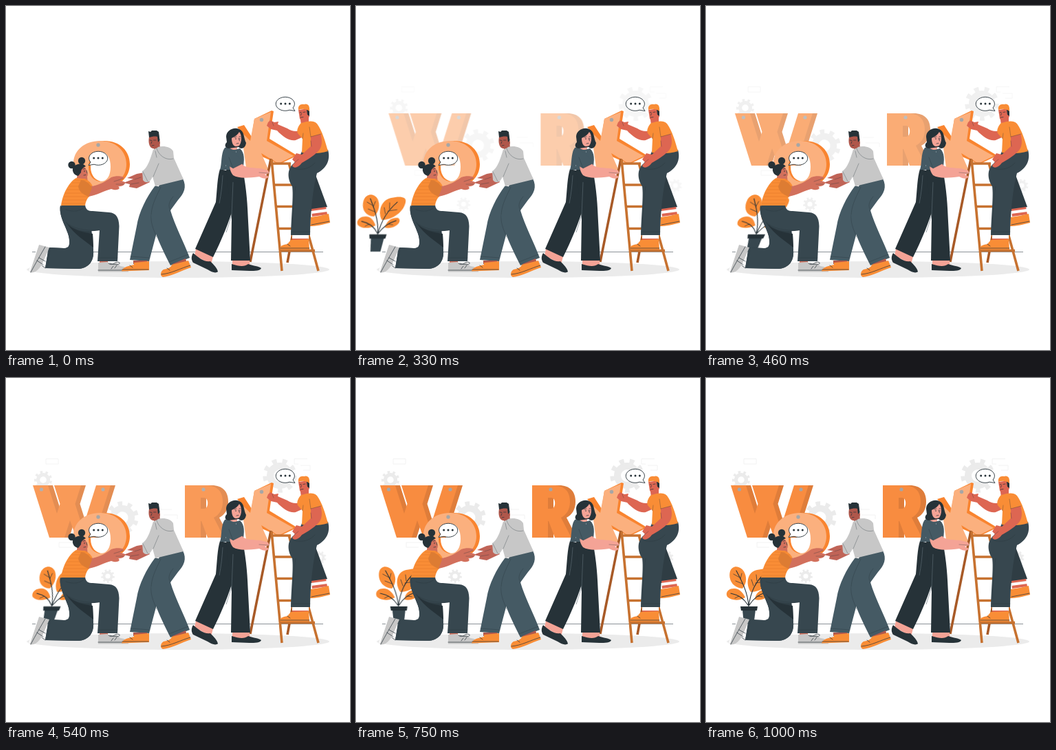
These frames come from a looping animation (500 by 500 pixels, 1040 ms). An HTML page:

```html
<!DOCTYPE html>
<html lang="en">
<head>
<meta charset="utf-8">
<title>Work</title>
<style>
  html, body { margin: 0; width: 100%; height: 100%; overflow: hidden; background: #fff; }
  svg { display: block; width: 100%; height: 100%; }
  .slide { animation: slide 1040ms linear infinite; }
  .plant { transform-origin: 62px 332px; animation: rush 1040ms linear infinite; }
  @keyframes slide {
    0% { transform: translateX(26px); opacity: 0; }
    24.04% { transform: translateX(15px); opacity: .27; }
    31.73% { transform: translateX(11.4px); opacity: .43; }
    44.23% { transform: translateX(6px); opacity: .72; }
    51.92% { transform: translateX(3px); opacity: .87; }
    62% { transform: translateX(.2px); opacity: .97; }
    72.12% { transform: translateX(-1px); opacity: 1; }
    96.15%, 100% { transform: none; opacity: 1; }
  }
  @keyframes rush {
    0% { transform: translateX(-190px) skewX(30deg); }
    24.04% { transform: translateX(-96px) skewX(20deg); }
    31.73% { transform: translateX(-31px) skewX(-8deg); }
    39% { transform: translateX(4px) skewX(-14deg); }
    44.23% { transform: translateX(11px) skewX(-16deg); }
    51.92% { transform: translateX(4.5px) skewX(-13deg); }
    62% { transform: translateX(1px) skewX(-4deg); }
    72.12% { transform: translateX(-.3px) skewX(1deg); }
    96.15%, 100% { transform: translateX(0) skewX(0deg); }
  }
  .face { fill: #f88c40; }
  .side { fill: #df7d3a; }
  .pin { fill: #a6a6a6; }
  .orange { fill: #f98d36; }
  .peach { fill: #fbb07e; }
  .slate { fill: #37474f; }
  .steel { fill: #455a64; }
  .ink { fill: #263238; }
  .grey { fill: #c7c7c7; }
  .s1 { fill: #d2705c; }
  .s2 { fill: #b0574b; }
  .s3 { fill: #f4a396; }
  .s4 { fill: #dd6652; }
  .line { fill: none; stroke: #263238; stroke-width: .7; stroke-linecap: round; stroke-linejoin: round; }
  .soft { fill: none; stroke: #263238; stroke-opacity: .55; stroke-width: .6; stroke-linecap: round; }
  .wood { fill: none; stroke: #c77230; stroke-width: 3.6; }
</style>
</head>
<body>
<svg viewBox="0 0 500 500">
  <defs>
    <g id="gear" fill="none" stroke="#ebebeb">
      <circle r="14" stroke-width="10"/>
      <circle r="21" stroke-width="7.5" pathLength="18" stroke-dasharray=".9 1.1"/>
    </g>
    <path id="w" d="M36 156H58L71 197L75.5 183L67 156H106L97.5 183L108.500 218L128 156H149L125 232H99L90 207L82 232H60Z"/>
    <path id="r" fill-rule="evenodd" d="M257 156H288C304 156 312 165 312 180C312 191 307 199 299 203L314 232H290L281 208H280V232H257ZM280 174V190H285C292 190 292 174 285 174Z"/>
    <g id="bubble">
      <path d="M-11 6L-14 10.500L-6 9.200A13.600 10 0 1 0 -11 6Z" fill="#fff" stroke="#263238" stroke-width=".9"/>
    </g>
    <g id="dots" class="ink"><circle cx="-6.300" r="1.500"/><circle r="1.500"/><circle cx="6.300" r="1.500"/></g>
  </defs>

  <ellipse cx="250" cy="383" rx="220" ry="12" fill="#ebebeb"/>
  <path d="M38 357.500H461" stroke="#59636a" stroke-width=".7"/>

  <g class="slide">
    <g fill="none" stroke="#f1f1f1" stroke-width=".9">
      <path d="M55 117.500H73V125H55ZM416 117.500H435M416 117.500V125H422M425 127H439V134H429M74 239H97M74 239V246H92M222 191H238M226 199H246V205"/>
    </g>
    <use href="#gear" transform="translate(395 142)"/>
    <use href="#gear" transform="translate(166 203) rotate(12) scale(.96)"/>
    <use href="#gear" transform="translate(51 148) rotate(8) scale(.53)"/>
    <use href="#gear" transform="translate(145 288) scale(.4)"/>
    <use href="#gear" transform="translate(453 261) rotate(10) scale(.38)"/>
    <g class="side">
      <use href="#w" x="7"/><use href="#w" x="3.500"/>
      <use href="#r" x="8"/><use href="#r" x="4"/>
    </g>
    <g class="face"><use href="#w"/><use href="#r"/></g>
    <g class="pin"><circle cx="48.500" cy="162" r="2.600"/><circle cx="138" cy="162" r="2.600"/><circle cx="284" cy="162" r="2.600"/></g>
  </g>

  <g class="plant">
    <g class="orange">
      <path d="M53 306C38 305 32 292 35 281C38 272 49 272 55 281C60 290 59 299 53 306Z"/>
      <path d="M65 311C57 299 60 282 74 279C86 276 96 277 96 284C96 299 81 311 65 311Z"/>
      <path d="M57 319C49 324 37 324 31 318C27 311 34 305 42 306C50 307 54 313 57 319Z"/>
      <path d="M71 322C72 312 79 307 88 308C94 311 91 318 84 321C79 323 75 323 71 322Z"/>
    </g>
    <path class="line" style="stroke-width:1.100" d="M62 332C61 312 52 295 44 280M62 332C65 309 73 296 84 285M61 330C55 320 46 315 36 313M63 330C69 320 76 315 86 312"/>
    <path class="line" d="M49 290L40 285M53 299L43 295M50 292L52 284M69 302L66 293M74 295L73 286M72 298L85 296M48 317L42 320M75 317L82 318"/>
    <path class="slate" d="M53 337H72L69.500 357H55Z"/>
    <path class="ink" d="M50 332H75L74 338H51Z"/>
  </g>

  <!-- Letter O -->
  <path fill="#f9842f" fill-rule="evenodd" d="M143 196C166 196 180 211 180 230C180 249 165 263 143 263C120 263 104 248 104 229C104 210 120 196 143 196ZM141 212C131 212 123 221 123 234C123 247 131 255 141 255C150 255 156 246 154 234C153 221 149 212 141 212Z"/>
  <path class="peach" fill-rule="evenodd" d="M137 196C160 196 175 211 175 230C175 249 160 263 137 263C114 263 98 248 98 229C98 210 114 196 137 196ZM137 212C127 212 120 221 120 234C120 247 128 255 138 255C147 255 152 246 152 234C152 221 147 212 137 212Z"/>
  <circle class="pin" cx="134" cy="202" r="2.700"/>

  <!-- Kneeling woman -->
  <g>
    <path fill="#2f3d44" d="M79 290C76 308 91 325 92 340C93 350 90 352 84 352L62 351L57 381L105 382C121 381 128 370 127 356L124 322Z"/>
    <path class="slate" d="M79 290C76 308 91 325 92 340C93 350 90 352 84 352L62 351L57 381L105 382C121 381 128 370 127 356L126 331C115 330 98 326 88 316Z"/>
    <path class="ink" d="M89 317C99 326 112 329 126 331L127 351C114 341 100 332 89 317Z"/>
    <path class="slate" d="M80 289H115C116 297 120 298 126 298L150 300C160 301 164 307 164.500 320L162 371H133L136 326C112 330 90 325 83 305Z"/>
    <path class="soft" d="M134 366H162M87 296C98 300 108 298 113 293M92 318C103 325 120 327 136 326M64 353L60 380"/>
    <path class="grey" d="M48 347L63 351L54 372C49 383 42 388 36 387.500L33 385Z"/>
    <path class="line" d="M36 387C43 374 50 362 57 350M45 370L54 376M48 366L57 371M52 377L57 381"/>
    <path fill="#fff" d="M45 352L48 347L35 386L33 385Z"/>
    <path class="s1" d="M136 371H148V376H136Z"/>
    <path class="grey" d="M134 373L147 372L153 376L160 373L166 378C174 379 178 382 178 386.500H134Z"/>
    <path class="line" d="M134 384H177M149 374C155 380 159 369 165 373C167 376 158 377 151 374M156 378L153 382M161 377L158 381"/>
    <path class="s1" d="M104 243L118 248L119 258L102 256Z"/>
    <path class="orange" d="M102 250C93 255 83 270 80 290H115C116 283 119 278 122 276L126 262C122 254 115 250 112 251Z"/>
    <path d="M100 253H118M96 257H122M92 262H125M89 267H124M86 272H123M84 277H121M82 282H117M81 287H115" stroke="#e27b2b" stroke-width=".6" fill="none"/>
    <path class="s1" d="M120 277L124 262C133 261 144 256 153 249C160 246 171 247 172 250L165 253L173 256C174 260 167 263 163 262C168 266 161 269 153 266C144 268 132 275 120 277Z"/>
    <path fill="#dd7c33" d="M109 253C116 253 122 259 125 264L120 277C112 274 106 270 105 262Z"/>
    <path class="soft" d="M157 255L170 251M160 259L171 259"/>
    <path class="s1" d="M104 235C109 231 116 233 117 239L119 245C118 251 112 252 107 249Z"/>
    <g class="ink">
      <circle cx="95.500" cy="231" r="5.200"/><circle cx="110" cy="225" r="5.200"/>
      <path d="M97 236C99 229 112 227 116 233C112 235 109 237 109 242L105 247C100 246 96 242 97 236Z"/>
      <circle cx="114" cy="240" r=".8"/>
    </g>
    <path class="line" d="M112 237L115 236.500M113 246L116 245.500M117 239L118 243"/>
  </g>
  <g transform="translate(134 221)"><use href="#bubble"/><use href="#dots"/></g>

  <!-- Man in hoodie -->
  <g>
    <path class="steel" d="M217 261C204 278 193 300 190 320L180 369L208 371L222 318L246 270Z"/>
    <path class="soft" d="M181 364L209 366M211 304C210 315 214 324 219 336"/>
    <path class="steel" d="M224 258L257 251C263 263 259 272 250 282L239 297C245 318 258 342 267 366L239 377C228 355 213 326 211 303C211 288 216 273 224 258Z"/>
    <path class="soft" d="M237 372L265 361M239 297C235 291 237 284 243 277M225 263C219 276 212 288 211 303"/>
    <path class="s2" d="M185 370H205V375H185ZM242 375L261 367L263 374L243 381Z"/>
    <path class="orange" d="M186 373L208 371V384L168 385.500C170 379 178 378 186 376ZM241 376L265 370L269 380C256 384 240 393 228 394C223 392 225 385 229 383C235 382 240 380 241 376Z"/>
    <path class="line" d="M169 383H207M226 390C240 389 254 381 268 377M180 377L184 380M234 381L238 384"/>
    <path class="s2" d="M211 195H223L224 207C219 211 214 209 214 204Z"/>
    <path fill="#c06457" d="M201 242L190 244L176 250L185 251.500L171 257L180 259L179 263L190 265L209 256Z"/>
    <path class="soft" d="M187 252L196 249M181 259L193 257"/>
    <path class="grey" d="M217 207C223 202 239 203 243 211L244 221L258 252L217 262L213 248C209 258 203 258 199 253L198 240C207 235 211 217 214 209Z"/>
    <path class="soft" d="M219 207C222 217 232 225 243 222M214 248L222 229M199 241L206 255M217 211L219 220"/>
    <path class="s2" d="M208 190L222 187L224 199C222 207 216 209 211 206C207 202 207 196 208 190Z"/>
    <path class="ink" d="M207 182L210 183L212 181L219 181L222 183L223.500 195L221 198L220 190C216 189 212 190 208 191Z"/>
    <path class="line" d="M209 195L212 195.500M214.500 195L218 195M212 203L215 202.500M212 197L211 200"/>
  </g>

  <!-- Letter K -->
  <path fill="#f9842f" d="M336 176L346 173L357 190L361 164L386 152L389 153L383 193L421 216L420 219L397 230L370 218Z"/>
  <path class="peach" d="M361 164L385 154L379 196L418 218L396 229L371 214L382 239L350 242L345 206L340 181L355 196Z"/>
  <circle class="pin" cx="371.500" cy="165.500" r="2.700"/>

  <!-- Ladder -->
  <path class="wood" style="stroke:#a85a27" d="M385 222L355 372M417 330L409 373"/>
  <path class="wood" d="M387 229H414M389 260H418M391 291.500H424M395 323.500H434M398 355.500H449"/>
  <path class="wood" d="M386 223L401 385M411 228L454 385"/>

  <!-- Standing woman -->
  <g>
    <path class="s3" d="M276 353L301 364L298 376L274 362ZM329 367H353L355 378H329Z"/>
    <path class="ink" d="M272 359C280 366 289 373 297 371C302 376 307 381 308 386C305 389 299 387 293 383L272 373C269 369 269 364 272 359ZM328 375C340 379 347 379 352 375C360 378 367 378 371 381C370 385 362 385 354 385L328 384Z"/>
    <path class="ink" d="M311 237L329 241L331 290C324 315 313 341 301 365L275 353L305 285C307 266 307 250 311 237Z"/>
    <path class="ink" d="M320 237H344C350 268 351 290 352 313L355 370H327L328 310Z"/>
    <path d="M330 256L328 304L320 329M315 246C314 261 313 272 310 287" fill="none" stroke="#617078" stroke-width=".6"/>
    <path class="s3" d="M324 201H336V213H324Z"/>
    <path class="steel" d="M318 206C324 203 327 210 333 209L340 207C347 213 347 224 344 238H311C314 230 312 214 318 206Z"/>
    <path d="M318 213h1m7 4h1m7-5h1m-17 12h1m17-3h1m-9 6h1m-10 5h1m16-1h1" stroke="#a8b8bf" stroke-width="1.100"/>
    <path class="s3" d="M326 222L343 228C344 235 356 235 370 236L381 239L383 243L376 245L382 248C380 252 373 251 368 248C352 250 338 251 330 246C325 240 324 231 326 222Z"/>
    <path class="steel" d="M316 210C323 206 337 214 344 229L330 236C319 231 313 222 316 210Z"/>
    <path class="soft" d="M324 220L330 236L344 229M368 242L381 243"/>
    <path class="ink" d="M320 190C320 181 331 175 339 179C347 182 345 192 349 199C348 207 342 209 338 205L324 207C318 207 317 201 321 198Z"/>
    <path class="s3" d="M328 192C333 190 337 187 339 183C343 187 343 198 339 203C333 206 328 203 328 192Z"/>
    <path class="line" d="M332 191L335 190M339 190H341M335 200L338 199.500M338 192L339.500 196"/>
    <circle class="ink" cx="334" cy="193" r=".8"/><circle class="ink" cx="340" cy="193" r=".7"/>
  </g>

  <!-- Man on ladder -->
  <g>
    <path fill="#2f3d44" d="M449 243L467 292L443 298L441 262Z"/>
    <path class="s4" d="M444 295L465 292L467 303L445 306Z"/>
    <path d="M443.500 298L466 295L467 299L444 302Z" fill="#fff"/>
    <path class="orange" d="M443 307C452 306 460 304 469 302L471 315C460 318 450 320 442 320Z"/>
    <path class="s4" d="M416 331H439V343H416Z"/>
    <path d="M416 333H440V338H416Z" fill="#fff"/>
    <path class="orange" d="M414 340L440 339L441 354H399C397 349 402 347 409 346Z"/>
    <path class="line" d="M399 352H441M444 318L470 313M409 346L413 349"/>
    <path class="slate" d="M430 211L468 209C472 224 466 236 452 243C447 263 443 290 442 333H414C415 300 418 277 416 262C409 252 408 237 418 229C425 222 428 217 430 211Z"/>
    <path class="soft" d="M415 328H442M418 236C430 239 441 237 449 228M421 262C418 280 417 301 417 321"/>
    <path class="s4" d="M428 181C421 183 415 182 409 178L395 172L396 168L390 169L384 166L381 169L379 174L385 179L394 181C402 190 413 197 421 195L430 191Z"/>
    <path class="s4" d="M427 158L440 156V171L429 173Z"/>
    <path class="orange" d="M429 170C437 168 446 165 452 171C460 182 464 197 468 211C456 215 439 215 430 213L431 193L424 185C422 180 425 174 429 170Z"/>
    <path class="s4" d="M443 188L457 185C460 195 460 205 454 211C446 219 437 224 430 228C425 235 418 237 416 232L420 227L416 223L422 214L430 216L443 204Z"/>
    <path class="orange" d="M441 173C449 169 455 177 458 186L443 190Z"/>
    <path class="soft" d="M443 190L458 186M441 176L443 190M431 193L432 185M387 169L389 174M419 228L425 223M444 204L443 196"/>
    <path class="s4" d="M425 151L440 149L441 160C439 167 431 168 427 164Z"/>
    <path class="ink" d="M437 151L441 150V160L438 158Z"/>
    <path class="orange" d="M425 151C424 145 428 142 433 143C438 141 442 144 441 153C436 149 430 149 425 151Z"/>
    <path class="line" d="M427 155L429 154.500M432 154.500L435 154M428 162L432 161.500M429.500 156L428.500 159"/>
  </g>
  <g transform="translate(406 142)"><use href="#bubble" transform="scale(-1 1)"/><use href="#dots"/></g>
</svg>
</body>
</html>
```
